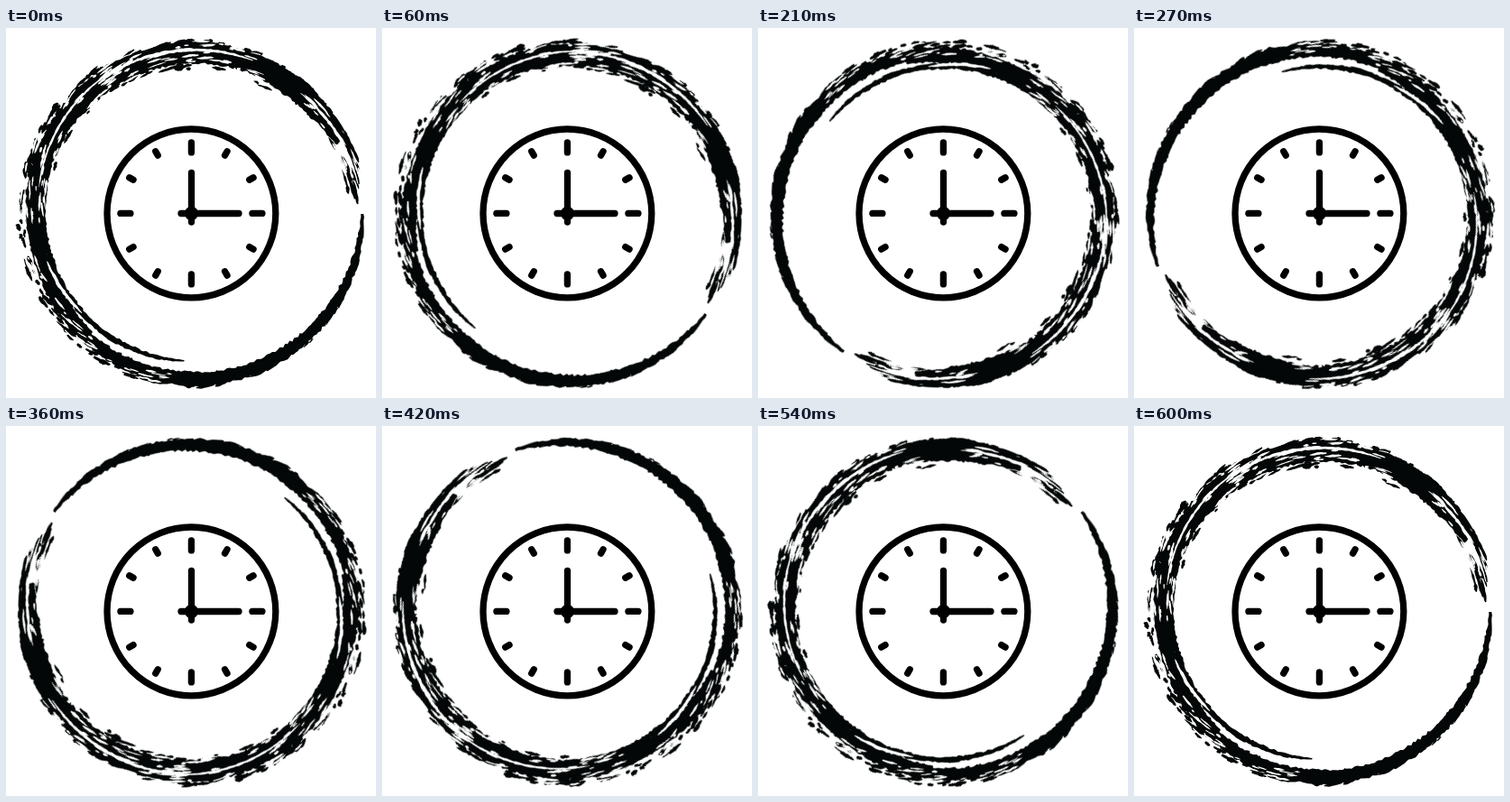
These frames come from a looping animation (410 px wide and 410 px high, 630 ms). An HTML page:

```html
<!DOCTYPE html>
<html lang="en">
<head>
<meta charset="utf-8">
<title>Clock in a turning brush ring</title>
<style>
  html, body { margin: 0; width: 100%; height: 100%; overflow: hidden; background: #fff; }
  svg { display: block; width: 100vw; height: 100vh; }
  #ring { transform-origin: 206px 206px; animation: turn 630ms steps(21, end) infinite; }
  #ink { fill: #040707; }
  #gaps { fill: #fff; }
  #clock { fill: none; stroke: #000; stroke-width: 7.3; stroke-linecap: round; }
  /* 20 steps make a full turn, the last one rests on the start pose */
  @keyframes turn { to { transform: rotate(378deg); } }
</style>
</head>
<body>
<svg viewBox="0 0 410 410">
  <g id="ring"><path id="ink"/><path id="gaps"/></g>
  <g id="clock">
    <circle cx="205.4" cy="205.4" r="93.4"/>
    <path d="M205.5 160.5V215M194 205.5H258"/>
    <circle cx="205.5" cy="205.5" r="4"/>
    <g id="ticks"></g>
  </g>
</svg>
<script>
  const C = 206;
  let seed = 71;
  const rnd = () => (seed = (seed * 16807) % 2147483647) / 2147483647;
  const span = (a, b) => a + (b - a) * rnd();
  const mix = (a, b, k) => a + (b - a) * k;

  const point = (deg, r) => {
    const t = deg * Math.PI / 180;
    return (C + r * Math.cos(t)).toFixed(1) + ' ' + (C + r * Math.sin(t)).toFixed(1);
  };

  // Bristle mark from one angle and radius to another, tapered and ragged
  const strand = (from, to, r0, r1, width) => {
    const inner = [], outer = [];
    const step = Math.min(1, (to - from) / 6);
    for (let a = from; a < to; a += step * span(0.5, 1.5)) {
      const k = (a - from) / (to - from);
      const half = width / 2 * Math.sqrt(Math.sin(Math.PI * mix(0.01, 0.99, k)));
      const rough = Math.min(1.3, half / 3);
      const r = mix(r0, r1, k);
      inner.unshift(point(a, r - half + span(-rough, rough)));
      outer.push(point(a, r + half + span(-rough, rough)));
    }
    return 'M' + outer.concat(inner).join('L') + 'Z';
  };

  // Random short marks, each drifting slightly outwards
  const flecks = (count, from, to, r0, r1, length, width) => {
    let d = '';
    for (let i = 0; i < count; i++) {
      const size = span(0.3, 1.5);
      const a = span(from, to), r = span(r0, r1), drift = size * span(0, 1.5);
      d += strand(a, a + length * size, r - drift, r + drift, width * span(0.6, 1.4));
    }
    return d;
  };

  const draw = (id, ...marks) => document.getElementById(id).setAttribute('d', marks.join(''));

  draw('ink',
    strand(0, 185, 189, 176, 15),     // thin end, growing under the tail
    strand(93, 200, 163, 165, 7),     // tail
    strand(130, 335, 173, 179, 23),   // main body
    strand(225, 350, 186, 188, 8),    // outer rim
    strand(285, 335, 178, 182, 25),   // heavy patch
    flecks(10, 15, 60, 189, 193, 6, 1.3),
    flecks(30, 55, 110, 187, 193, 5, 2.6),
    flecks(120, 105, 315, 186, 193, 4, 3.6),
    flecks(40, 170, 300, 160, 168, 5, 3.2),
    flecks(34, 312, 350, 174, 193, 7, 2.8));

  draw('gaps',
    strand(138, 162, 164, 169, 4),
    strand(190, 245, 172, 182, 2.6),
    strand(238, 292, 180, 183, 3.6),
    strand(312, 350, 180, 187, 3),
    flecks(40, 95, 180, 176, 192, 4, 1.8),
    flecks(65, 175, 245, 163, 191, 5, 2),
    flecks(50, 235, 295, 167, 192, 5, 2),
    flecks(24, 312, 345, 172, 192, 6, 2));

  document.getElementById('ticks').innerHTML = Array.from({ length: 12 }, (_, i) => {
    const half = i % 3 ? 2.5 : 5.5;
    const mid = i % 3 ? 76.8 : 73;
    return `<path d="M0 ${-mid - half}V${half - mid}" transform="translate(205.4 205.4) rotate(${i * 30})"/>`;
  }).join('');
</script>
</body>
</html>
```
